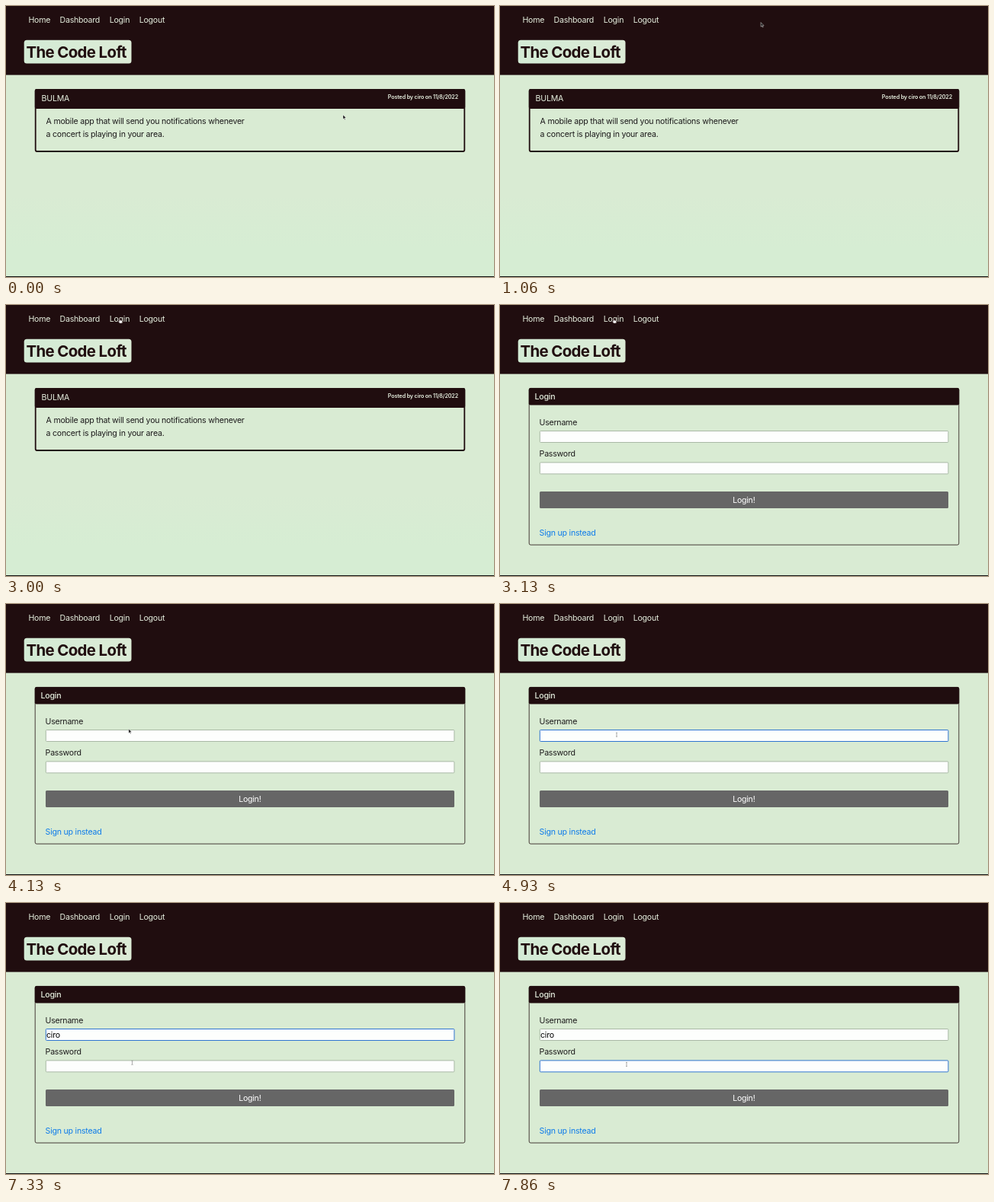
An HTML page for the animation above (8 s loop, 640 px wide and 356 px high).

```html
<!DOCTYPE html>
<html lang="en">
<head>
<meta charset="utf-8">
<title>Blog login</title>
<style>
  html, body { margin: 0; width: 100%; height: 100%; overflow: hidden; background: #d9ebd3; }
  svg { display: block; width: 100%; height: 100%; }
  text { font: 430 10.6px Inter, "Open Sans", sans-serif; letter-spacing: -.022em; fill: #1c1a1b; white-space: pre; }
  .light text, text.light { fill: #e6efdf; }
  .dark { fill: #200d0f; }
  text.title { font-size: 20.4px; font-weight: 700; letter-spacing: -.03em; fill: #200d0f; }
  text.head { font-weight: 500; }
  text.by { font-size: 7.2px; font-weight: 600; letter-spacing: -.02em; text-anchor: end; }
  text.mid { text-anchor: middle; fill: #fff; }
  text.link { fill: #0d7bea; }
  text.typed { fill: #000; }
  .field { fill: #fdfefd; stroke: #a9b9a5; stroke-width: 1; }
  .field.focus { stroke: #2f74d0; }
</style>
</head>
<body>
<svg viewBox="0 0 640 356" preserveAspectRatio="none">
  <defs>
    <linearGradient id="page" x2="0" y2="1">
      <stop offset=".6" stop-color="#d9ebd3"/>
      <stop offset=".85" stop-color="#d6edd3"/>
    </linearGradient>
    <linearGradient id="badge" x2="1" y2="0">
      <stop offset="0" stop-color="#d3ebd5"/>
      <stop offset="1" stop-color="#dcebd6"/>
    </linearGradient>
  </defs>

  <rect width="640" height="356" fill="#d9ebd3"/>
  <rect id="tint" y="90" width="640" height="266" fill="url(#page)"/>
  <rect class="dark" width="640" height="90.6"/>
  <g class="light">
    <text x="29.4" y="22.3">Home</text>
    <text x="70.5" y="22.3">Dashboard</text>
    <text x="135.7" y="22.3">Login</text>
    <text x="174.7" y="22.3">Logout</text>
  </g>
  <rect x="23.7" y="44.8" width="140.8" height="30.6" rx="3.5" fill="url(#badge)"/>
  <text class="title" x="26.4" y="68">The Code Loft</text>

  <g id="home">
    <rect x="38.7" y="109.8" width="562.6" height="81.2" rx="2" fill="none" stroke="#200d0f" stroke-width="1.8"/>
    <rect class="dark" x="37.8" y="108.9" width="564.4" height="26" rx="2"/>
    <text class="light" x="46.6" y="125">BULMA</text>
    <text class="light by" x="593" y="122.3">Posted by ciro on 11/8/2022</text>
    <text x="52.6" y="155.2">A mobile app that will send you notifications whenever</text>
    <text x="52.6" y="172">a concert is playing in your area.</text>
  </g>

  <g id="login">
    <rect x="38.2" y="109.4" width="563.6" height="205.7" rx="2" fill="none" stroke="#200d0f" stroke-width=".8"/>
    <rect class="dark" x="37.8" y="108.9" width="564.4" height="22.7" rx="2"/>
    <text class="light head" x="45.5" y="124">Login</text>
    <text x="51.5" y="157.8">Username</text>
    <rect id="user" class="field" x="52.3" y="165.5" width="535.6" height="15" rx="1"/>
    <text x="51.6" y="199.3">Password</text>
    <rect id="pass" class="field" x="52.3" y="206.9" width="535.6" height="15" rx="1"/>
    <text id="typed" class="typed" x="53" y="176.8"></text>
    <rect id="caret" width=".8" height="11"/>
    <rect x="52" y="245" width="536" height="22" rx="1.5" fill="#666"/>
    <text class="mid" x="319.8" y="260">Login!</text>
    <text class="link" x="51.6" y="303">Sign up instead</text>
  </g>

  <rect y="355" width="640" height="1" fill="#111"/>

  <g id="cursor">
    <path id="arrow" d="M0 0V5.6L1.3 4.4 2.2 6.4 3.1 6 2.2 4.1H4Z" fill="#111" stroke="#fff" stroke-width=".45"/>
    <path id="hand" d="M1.4 .3Q2.4 -.2 2.6 .8V2.4L5 3Q5.8 3.3 5.6 4.4L5 6.6H2.2L.3 4.2Q.2 3.3 1.5 3.8Z" fill="#fff" stroke="#3a2224" stroke-width=".6"/>
    <path id="beam" d="M-1 -2.7Q0 -2.7 0 -2V2Q0 2.7 -1 2.7M1 -2.7Q0 -2.7 0 -2M0 2Q0 2.7 1 2.7" fill="none" stroke="#888" stroke-width=".7"/>
  </g>
</svg>
<script>
const LOOP = 8000, TICK = 1000 / 15;
const NAME = "ciro";
const SWAP = 3130, FOCUS_USER = 4460, FOCUS_PASS = 7400;
const KEYS = [5600, 5730, 5930, 6130];
const CARET_ON = [[4460, 4930], [5400, 6600], [7400, 7860]];
const LINKS = [[29, 59], [70, 124], [135, 163], [174, 209]];

// time, x, y
const PATH = [
  [0, 442, 143], [267, 212, 70], [400, 212, 70], [667, 65, 18],
  [800, 65, 18], [1133, 374, 22], [1267, 374, 22], [1533, 503, 28],
  [1800, 13, 20], [2067, 141.5, 13.7], [2200, 141.5, 13.7], [2533, 147, 17.5],
  [3200, 147, 17.5], [3400, 165, 6], [3667, 215, 112], [4267, 153, 171.7],
  [6600, 153, 171.7], [6800, 157, 173], [6933, 157, 173], [7400, 166, 212],
  [8000, 166, 212]
];

const $ = id => document.getElementById(id);
const show = (id, on) => $(id).style.display = on ? "" : "none";
const within = (v, [a, b]) => v >= a && v < b;

function cursorAt(t) {
  const i = Math.max(1, PATH.findIndex(p => p[0] >= t));
  const [t0, x0, y0] = PATH[i - 1], [t1, x1, y1] = PATH[i];
  const u = (t - t0) / (t1 - t0), k = u * u * (3 - 2 * u);
  return [x0 + (x1 - x0) * k, y0 + (y1 - y0) * k];
}

function shapeAt(x, y, form) {
  if (within(y, [12, 26]) && LINKS.some(l => within(x, l))) return "hand";
  const inField = within(y, [165, 181]) || within(y, [206, 222]);
  return form && inField && within(x, [52, 588]) ? "beam" : "arrow";
}

function draw(t) {
  const form = t >= SWAP;
  show("home", !form);
  show("tint", !form);
  show("login", form);

  const onPass = t >= FOCUS_PASS;
  $("user").classList.toggle("focus", t >= FOCUS_USER && !onPass);
  $("pass").classList.toggle("focus", onPass);

  const typed = NAME.slice(0, KEYS.filter(k => t >= k).length);
  $("typed").textContent = typed;
  const end = typed && !onPass && form ? $("typed").getComputedTextLength() : 0;
  $("caret").setAttribute("x", 53.6 + end);
  $("caret").setAttribute("y", onPass ? 209 : 167.6);
  show("caret", CARET_ON.some(span => within(t, span)));

  const tick = Math.floor((t + 7) / TICK) * TICK;
  const [x, y] = cursorAt(Math.min(tick, LOOP - 1));
  const shape = shapeAt(x, y, form);
  for (const id of ["arrow", "hand", "beam"]) show(id, id === shape);
  $("cursor").setAttribute("transform", `translate(${x} ${y})`);
}

const start = performance.now();
function frame() {
  draw((performance.now() - start) % LOOP);
  requestAnimationFrame(frame);
}
frame();
</script>
</body>
</html>
```
